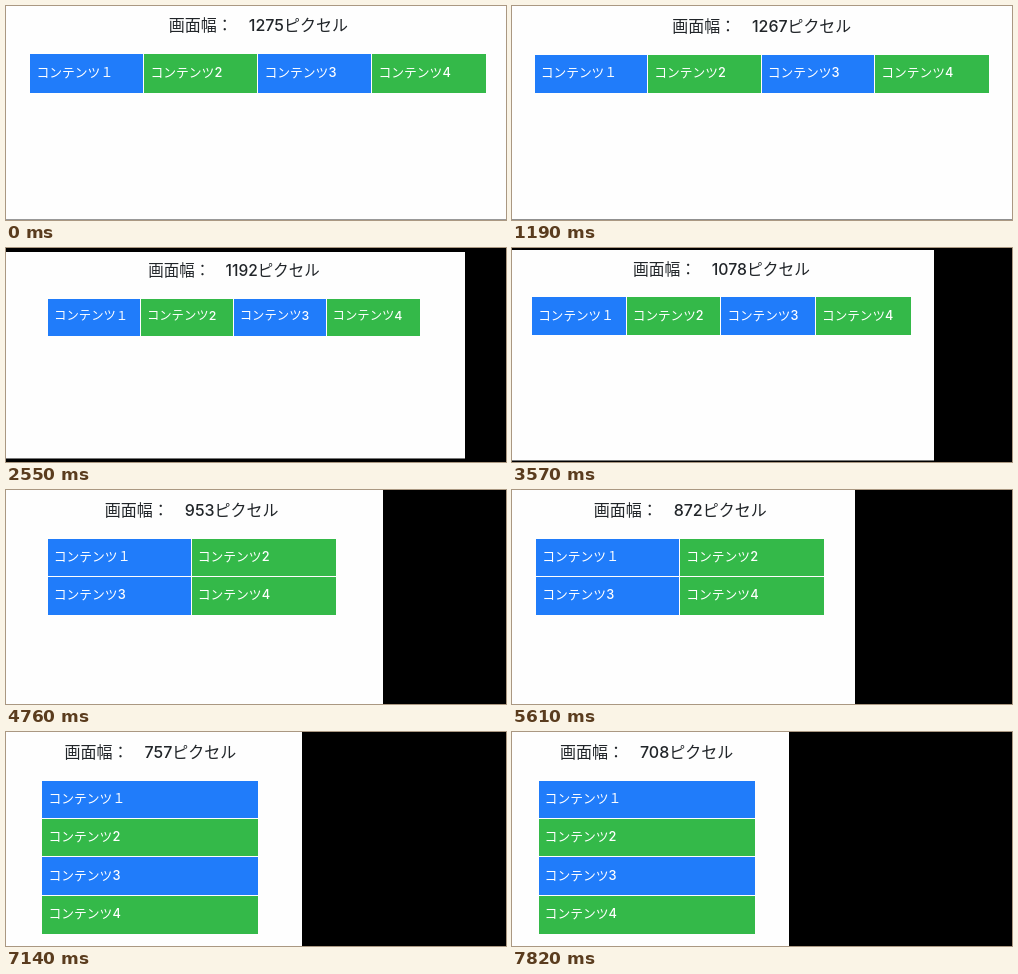
These frames come from a looping animation (500x214 px, 7990 ms). An HTML page with a canvas:

```html
<!DOCTYPE html>
<html lang="ja">
<head>
<meta charset="utf-8">
<title>画面幅とグリッド</title>
<style>
  html, body { margin: 0; width: 100%; height: 100%; overflow: hidden; background: #000; }
  canvas { display: block; width: 500px; height: 214px; }
</style>
</head>
<body>
<canvas id="stage"></canvas>
<script>
const W = 500, H = 214, LOOP = 7990, STEP = 170, START = 1020, BASE = 0.4;
const COLORS = ['#207cfa', '#34b949'];
const FONT = 'Inter, "Noto Sans CJK JP", "Noto Sans CJK", sans-serif';
const LABELS = ['コンテンツ１', 'コンテンツ2', 'コンテンツ3', 'コンテンツ4'];

// Window drag: [time, page width], with a short rest near the end
const DRAG = [[START, 1275], [1870, 1233], [2550, 1192], [3570, 1078], [4760, 953],
  [5950, 840], [6120, 840], [6460, 806], [7820, 708]];

const canvas = document.getElementById('stage');
const ctx = canvas.getContext('2d');
const dpr = window.devicePixelRatio || 1;
canvas.width = Math.round(W * dpr);
canvas.height = Math.round(H * dpr);

const clamp = u => Math.min(1, Math.max(0, u));
const smooth = u => u * u * (3 - 2 * u);

function pageWidth(t) {
  const i = DRAG.findIndex(key => t <= key[0]);
  if (i <= 0) return DRAG[0][1];
  const [t0, a] = DRAG[i - 1], [t1, b] = DRAG[i];
  return Math.round(a + (b - a) * (t - t0) / (t1 - t0));
}

// The view shrinks slightly and recovers early in the drag
function zoomAt(t) {
  const dip = Math.sin(Math.PI * clamp((t - START) / 3060));
  return 1 - 0.033 * Math.pow(Math.max(0, dip), 1.2);
}

// Container width and column count for a page width
function layout(px) {
  if (px >= 1200) return [1140, 4];
  if (px >= 992) return [960, 4];
  if (px >= 768) return [720, 2];
  return [540, 1];
}

function text(str, x, y, size, color, align) {
  ctx.font = `500 ${size}px ${FONT}`;
  ctx.fillStyle = color;
  ctx.textAlign = align;
  ctx.fillText(str, x, y);
}

function draw(time) {
  const t = Math.floor((time % LOOP) / STEP) * STEP;
  const px = pageWidth(t);
  const zoom = zoomAt(t);
  const scale = BASE * zoom;
  const shift = -2.6 - 4.4 * smooth(clamp((1150 - px) / 380));
  const mid = shift + px * scale / 2;
  const lift = t <= START ? 0.4 : 0;
  const yAt = y => H / 2 + (y - H / 2) * zoom - lift;

  ctx.setTransform(dpr, 0, 0, dpr, 0, 0);
  ctx.fillStyle = '#000';
  ctx.fillRect(0, 0, W, H);
  ctx.fillStyle = '#fefefe';
  const top = Math.round(yAt(0));
  ctx.fillRect(0, top, Math.ceil(shift + px * scale), yAt(H) - top);

  text(`画面幅：　${px}ピクセル`, mid, yAt(25.7), 40 * scale, '#212529', 'center');

  const [container, cols] = layout(px);
  const rows = LABELS.length / cols;
  const left = mid - container * scale / 2;
  const cw = container * scale / cols;
  const ch = 96 * scale;
  LABELS.forEach((label, i) => {
    const col = i % cols, row = Math.floor(i / cols);
    const x = left + col * cw, y = yAt(48.6) + row * ch;
    const x0 = Math.round(x), y0 = Math.round(y);
    // one pixel stays free as the line between neighbours
    const x1 = Math.round(x + cw) - (col < cols - 1);
    const y1 = Math.round(y + ch) - (row < rows - 1);
    ctx.fillStyle = COLORS[i % 2];
    ctx.fillRect(x0, y0, x1 - x0, y1 - y0);
    text(label, x + 15 * scale, y + 56 * scale, 32 * scale, '#fff', 'left');
  });
}

function tick() {
  draw(performance.now());
  requestAnimationFrame(tick);
}
tick();
</script>
</body>
</html>
```
